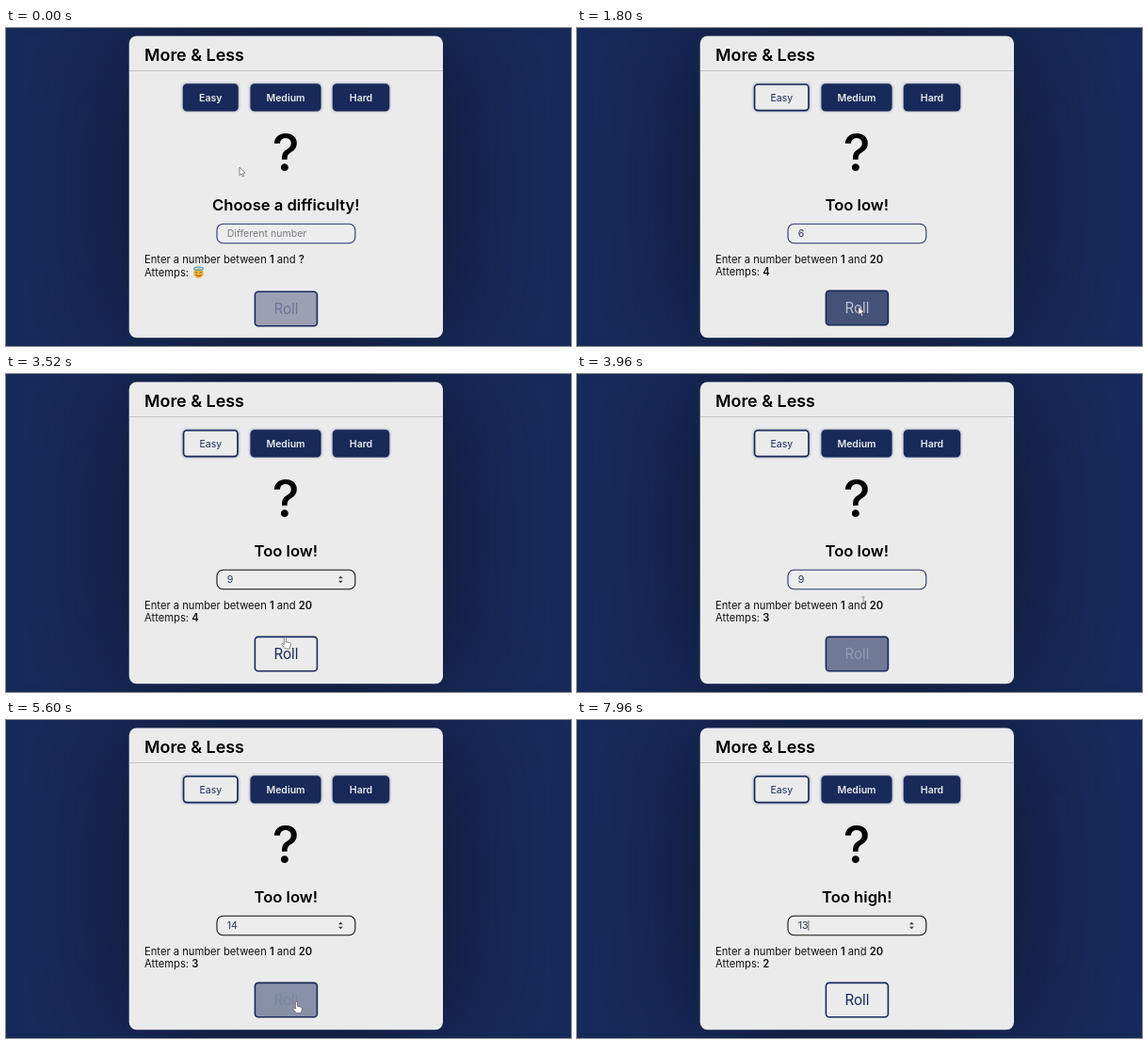
An HTML page for the animation above (8000 ms loop, 600 by 338 pixels).

```html
<!DOCTYPE html>
<html lang="en">
<head>
<meta charset="utf-8">
<title>More &amp; Less</title>
<style>
  html, body { margin: 0; width: 100%; height: 100%; overflow: hidden; background: #172a5c; }
  svg { display: block; width: 100vw; height: 100vh; font-family: Inter, "Open Sans", sans-serif; }
  .mid { text-anchor: middle; }
  .b { font-weight: 600; }
  .btn text { font-size: 10.5px; font-weight: 600; text-anchor: middle; }
  .btn rect { stroke: #172a5a; stroke-width: 1.6; }
  .info { font-size: 11.2px; fill: #111; }
  .field { font-size: 10.6px; }
</style>
</head>
<body>
<svg viewBox="0 0 600 338">
  <defs>
    <filter id="far" x="-70%" y="-70%" width="240%" height="240%" color-interpolation-filters="sRGB"><feGaussianBlur stdDeviation="64"/></filter>
    <filter id="near" x="-20%" y="-30%" width="140%" height="160%"><feGaussianBlur stdDeviation="1.8"/></filter>
  </defs>
  <rect width="600" height="338" fill="#172a5c"/>
  <rect x="131" y="8.5" width="333" height="321" rx="8" fill="#0b1220" opacity=".85" filter="url(#far)"/>
  <rect x="130.7" y="8.5" width="333.3" height="320.8" rx="8" fill="#ebebec"/>
  <path d="M131 45.5H464" stroke="#c3c5ca"/>
  <text x="147" y="35" font-size="17.9" class="b">More &amp; Less</text>

  <g id="levels"></g>

  <text x="297" y="152.3" font-size="54.5" font-weight="500" class="mid">?</text>
  <text id="status" x="297.3" y="194" font-size="16.6" class="mid b"></text>

  <rect id="box" x="224" y="208.2" width="146.8" height="20.5" rx="6.5" fill="#ededee" stroke-width="1.1"/>
  <text id="value" x="234.7" y="222.4" class="field"></text>
  <path id="caret" d="M0 213V224" stroke="#333" stroke-width=".7"/>
  <path id="spin" d="M352.9 217.2L355.3 214.8L357.7 217.2ZM352.9 219.8L355.3 222.2L357.7 219.8Z" fill="#333"/>

  <text x="147" y="249.6" class="info">Enter a number between <tspan class="b">1</tspan> and <tspan id="max" class="b"></tspan></text>
  <text id="tries" x="147" y="263.2" class="info">Attemps: <tspan id="left" class="b"></tspan></text>
  <g id="angel">
    <circle cx="204.5" cy="260.6" r="5.4" fill="#f3b63f"/>
    <ellipse cx="204.5" cy="255.8" rx="4.9" ry="1.6" fill="none" stroke="#4c9fcb" stroke-width="1.2"/>
    <path d="M201.3 260.2q1-1.3 2 0M205.7 260.2q1-1.3 2 0M201.5 262.4q3 3 6 0" fill="none" stroke="#5b3c14" stroke-width=".9"/>
  </g>

  <g id="roll" class="btn">
    <rect x="264.4" y="279.4" width="66" height="36.4" rx="3.5"/>
    <text x="297.4" y="303.2" style="font-size:15.2px;font-weight:400">Roll</text>
  </g>

  <g id="cursor" stroke="#555" stroke-width=".7" stroke-linejoin="round">
    <path id="arrow" fill="#fff" d="M0 0V8.6L2 6.9L3.4 10L4.7 9.4L3.4 6.4L6 6.2Z"/>
    <path id="hand" fill="#fff" d="M-1 1Q0-.6 1 1V5L5 6Q6.2 6.4 6 8L5 12.3H0L-3.5 8Q-3.6 6.6-2.4 6.8L-1 8Z"/>
    <path id="beam" fill="none" stroke="#777" d="M-1.6-4H1.6M0-4V4M-1.6 4H1.6"/>
  </g>
</svg>
<script>
const $ = id => document.getElementById(id);
const LOOP = 8000, NAVY = [23, 42, 90], PALE = [235, 235, 236];

// [time, value] steps; each list is read at its latest entry
const status = [[0, 'Choose a difficulty!'], [480, 'Start guessing...'], [1700, 'Too low!'], [5640, 'Too high!']];
const attempts = [[0, ''], [480, 5], [1700, 4], [3760, 3], [5640, 2]];
const typed = [[0, ''], [1240, '6'], [2600, ''], [2840, '9'], [4560, ''], [4800, '1'], [5000, '14'],
               [6640, '1'], [6720, ''], [6800, '1'], [6900, '13']];
const focus = [[0, false], [880, true], [1680, false], [2140, true], [3740, false], [4120, true], [5620, false], [5900, true]];
const rollState = [[0, 'off'], [480, 'on'], [1460, 'hover'], [1700, 'off'], [2140, 'on'], [3600, 'hover'],
                   [3760, 'off'], [4120, 'on'], [5460, 'hover'], [5640, 'off'], [5900, 'on']];
const easyState = [[0, 'hover'], [340, 'on']];
const looks = { off: [[156, 160, 179], [107, 117, 150]], on: [PALE, NAVY], hover: [NAVY, PALE] };

// cursor stops: time, x, y
const path = [[40, 248, 148], [380, 216, 75], [560, 216, 75], [860, 295, 212], [1280, 295, 212], [1560, 299, 297],
  [1780, 299, 297], [2120, 290, 223], [3240, 290, 223], [3640, 298, 295], [3780, 298, 293], [3960, 304, 241],
  [4080, 303, 219], [4200, 303, 219], [4700, 393, 291], [5140, 393, 291], [5280, 411, 321], [5540, 310, 300],
  [5680, 306, 298], [5880, 298, 219], [5960, 298, 219], [6200, 286.5, 245], [7440, 286.5, 245], [7920, 302.5, 246]];

const buttons = [['Easy', 188, 58.5], ['Medium', 259.7, 74.6], ['Hard', 347, 60]];
$('levels').innerHTML = buttons.map(([name, x, w]) => `<g class="btn">
  <rect x="${x}" y="59.5" width="${w}" height="28.6" rx="4" style="stroke:none" fill="#172a5a" opacity=".7" filter="url(#near)"/>
  <rect x="${x + .6}" y="60" width="${w - 1.2}" height="27.6" rx="3.5" fill="#172a5a"/>
  <text x="${x + w / 2}" y="77.6" fill="#ebebec">${name}</text></g>`).join('');
const [, easyRect] = $('levels').querySelectorAll('rect');
const easyText = $('levels').querySelector('text');
const [rollRect, rollText] = $('roll').children;

const lerp = (a, b, k) => a + (b - a) * k;
const indexAt = (list, t) => list.findLastIndex(s => s[0] <= t);
const at = (list, t) => list[indexAt(list, t)][1];
const show = (el, on) => el.setAttribute('visibility', on ? 'visible' : 'hidden');

function paint(rect, text, states, t, fade) {
  const i = indexAt(states, t);
  const from = looks[states[Math.max(0, i - 1)][1]], to = looks[states[i][1]];
  const k = Math.min(1, (t - states[i][0]) / fade);
  [rect, text].forEach((el, n) =>
    el.setAttribute('fill', `rgb(${to[n].map((c, j) => lerp(from[n][j], c, k))})`));
}

function cursorAt(t) {
  const i = indexAt(path, t);
  if (i < 0) return path[0].slice(1);
  const a = path[i], b = path[i + 1] || a;
  let k = b === a ? 0 : (t - a[0]) / (b[0] - a[0]);
  k = k * k * (3 - 2 * k);
  return [lerp(a[1], b[1], k), lerp(a[2], b[2], k)];
}

function cursorKind(x, y, rollOff) {
  const inside = (l, t, r, b) => x >= l && x <= r && y >= t && y <= b;
  if (inside(224, 208, 371, 229) || (!rollOff && inside(264, 279, 331, 317)) ||
      buttons.some(([, l, w]) => inside(l, 59, l + w, 88))) return 'hand';
  return inside(147, 238, 326, 254) || inside(218, 180, 376, 198) ? 'beam' : 'arrow';
}

function draw(t) {
  const started = t >= 480, text = at(typed, t), focused = at(focus, t);
  $('status').textContent = at(status, t);
  $('max').textContent = started ? '20' : '?';
  $('left').textContent = at(attempts, t);
  $('tries').setAttribute('y', started ? 263.2 : 264.2);
  $('roll').setAttribute('transform', `translate(0 ${started ? 0 : .9})`);
  show($('angel'), !started);

  $('value').textContent = text || 'Different number';
  $('value').setAttribute('fill', text ? '#2b3963' : '#7b7b80');
  $('box').setAttribute('stroke', focused ? '#111' : '#24366b');
  show($('spin'), focused);

  // caret blink restarts on each key press or focus
  const last = Math.max(typed[indexAt(typed, t)][0], focus[indexAt(focus, t)][0]);
  show($('caret'), focused && (t - last) % 1060 < 530);
  const width = text ? $('value').getComputedTextLength() : 0;
  $('caret').setAttribute('transform', `translate(${235 + width} 0)`);

  paint(easyRect, easyText, easyState, t, 200);
  easyText.style.fontWeight = t < 340 ? 600 : 400;
  paint(rollRect, rollText, rollState, t, 300);

  const [x, y] = cursorAt(t), kind = cursorKind(x, y, at(rollState, t) === 'off');
  $('cursor').setAttribute('transform', `translate(${x} ${y})`);
  for (const id of ['arrow', 'hand', 'beam']) show($(id), id === kind);
}

const start = performance.now();
function tick(now) {
  draw(Math.max(0, now - start) % LOOP);
  requestAnimationFrame(tick);
}
draw(0);
requestAnimationFrame(tick);
</script>
</body>
</html>
```
